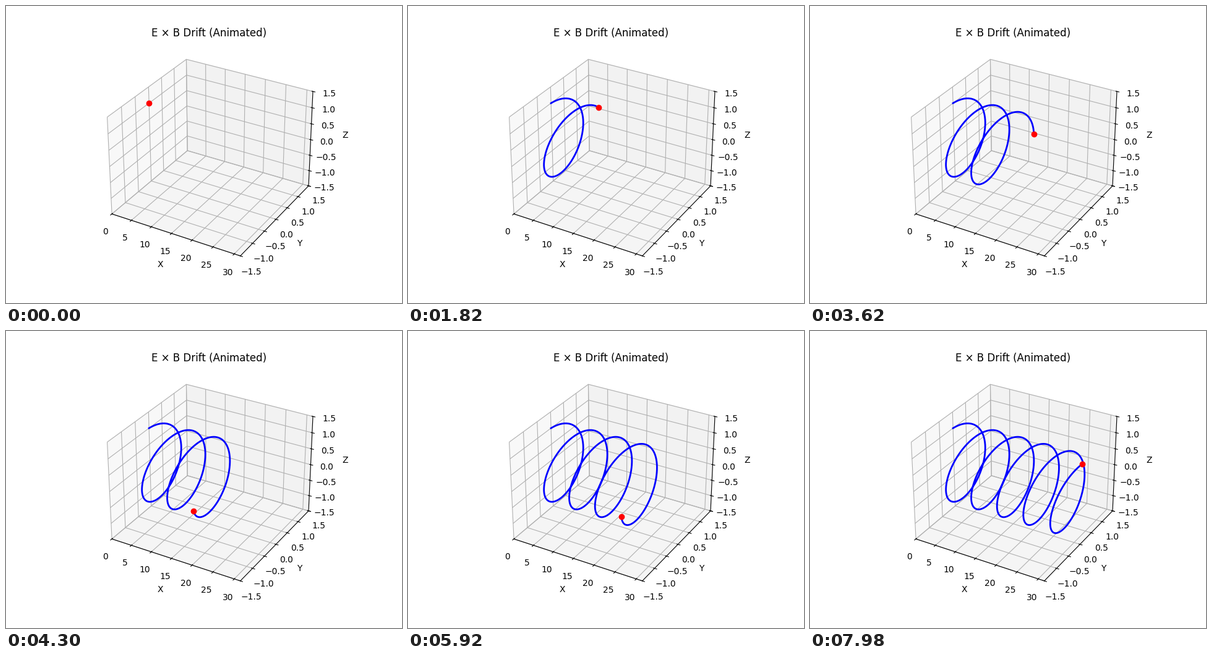
Write a matplotlib script that moves like this. It is 640 px wide and 480 px high and loops after 8000 ms.

```python
import matplotlib.pyplot as plt
import numpy as np
from matplotlib.animation import FuncAnimation
from matplotlib.lines import Line2D
from matplotlib.transforms import IdentityTransform
from mpl_toolkits.mplot3d import proj3d

FRAMES = 400
INTERVAL = 20
T_END = 10 * np.pi

fig = plt.figure(figsize=(6.4, 4.8), dpi=100)
ax = fig.add_subplot(projection="3d")
ax.set(xlim=(0, T_END), ylim=(-1.5, 1.5), zlim=(-1.5, 1.5),
       xlabel="X", ylabel="Y", zlabel="Z", title="E × B Drift (Animated)")

# The box never moves: render it once and keep it as the backdrop.
fig.canvas.draw()
backdrop = np.array(fig.canvas.buffer_rgba())

# Helix drifting along x, projected to pixels.
t = np.linspace(0, T_END, FRAMES)
u, v, _ = proj3d.proj_transform(t, np.sin(t), np.cos(t), ax.get_proj())
px, py = ax.transData.transform(np.column_stack([u, v])).T

ax.remove()
fig.figimage(backdrop)


def add_line(**style):
    return fig.add_artist(Line2D([], [], transform=IdentityTransform(), **style))


trail = add_line(color="b", lw=2)
particle = add_line(color="r", marker="o", ls="none")


def update(i):
    trail.set_data(px[:i + 1], py[:i + 1])
    particle.set_data(px[i:i + 1], py[i:i + 1])
    return trail, particle


anim = FuncAnimation(fig, update, frames=FRAMES, interval=INTERVAL, repeat=True)
plt.show()
```
